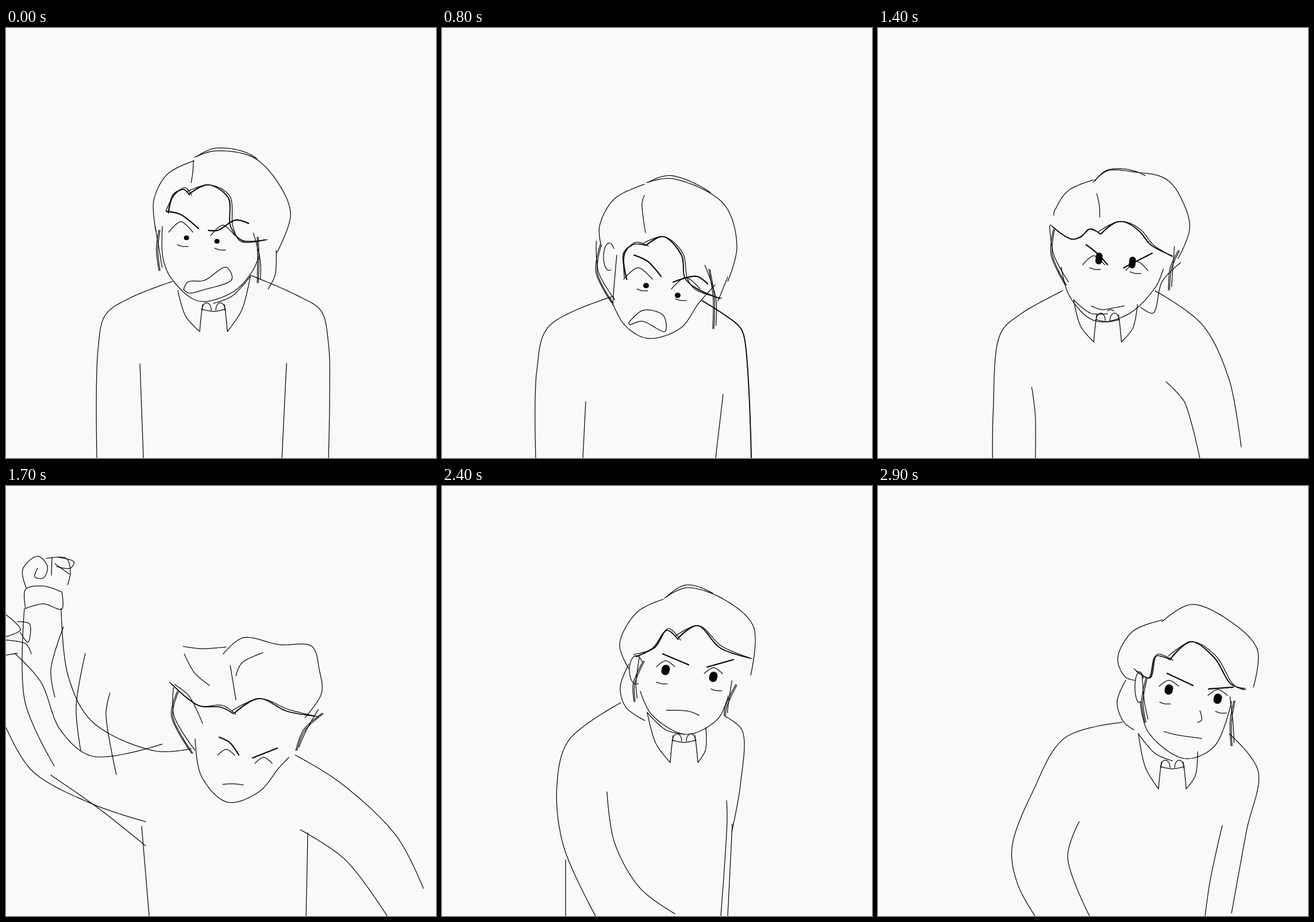
Recreate the animation shown at these times as an HTML page. Size 748x748 px, loop 3000 ms.

```html
<!DOCTYPE html>
<html lang="en">
<head>
<meta charset="utf-8">
<title>Angry line drawing</title>
<style>
html, body { margin: 0; width: 100%; height: 100%; overflow: hidden; background: #f9f8fa; }
svg { display: block; width: 100%; height: 100%; }
path { fill: none; stroke: #060606; stroke-linecap: round; stroke-linejoin: round; }
</style>
</head>
<body>
<svg id="stage" viewBox="0 0 748 748"></svg>
<script>
// lines: key points of smooth strokes. The face details and collar follow rules.
// eyes: centres, pupil width and height; lid: outward shift, half width, rise.
const shout = {
  lines: {
    hair: ["328,225 362,214 430,225 475,272 495,325 471,391", "327,231 281,254 257,300 261,354"],
    part: ["326,230 325,250 322,269"],
    fringe: ["283,322 292,290 310,281 319,290", "319,289 352,273 387,295 391,345 412,371 450,368"],
    locks: ["268,352 264,385 268,422", "439,364 440,405 439,443"],
    tail: ["470,387 468,430 456,454"],
    jaw: ["272,345 273,400 288,436 335,475 395,459 428,424 441,395"],
    brows: ["279,319 303,324 335,349", "352,352 368,352 400,334 422,340"],
    mouth: ["309,455 316,442 345,439 383,416 393,437 345,455 318,461 309,455"],
    shoulders: ["425,430 510,467 548,492 561,550 563,640 561,748", "289,441 215,470 173,499 160,560 158,748"],
    arms: ["488,583 480,748", "233,584 239,748"]
  },
  eyes: { at: "314,365 367,371", wide: 8, tall: 0, bag: 14 },
  lid: { out: 10, half: 21, up: 28 },
  collar: "299,457 425,432 361,491", halo: true
};

const bow = {
  lines: {
    hair: ["352,291 387,265 450,280 505,323 523,385 508,447", "352,293 298,304 264,360 272,412"],
    part: ["350,313 360,340 374,373"],
    fringe: ["341,449 332,400 352,380 371,392", "371,391 412,375 445,397 480,455 516,507"],
    locks: ["274,412 260,450 294,499", "480,414 500,460 535,474"],
    tail: ["458,500 454,516 457,531 444,524"],
    wisps: ["306,404 318,438 366,452"],
    jaw: ["300,455 312,507 345,546 380,558 430,538 457,500 477,458"],
    brows: ["340,437 353,422 389,455", "412,457 445,444 467,457"],
    mouth: ["337,531 372,522 408,510 417,540 385,534 345,542 337,531"],
    shoulders: ["470,484 525,525 538,575 555,675 552,748", "279,482 220,508 187,527 172,600 175,748"],
    arms: ["498,638 487,748", "249,653 256,748"]
  },
  eyes: { at: "375,470 422,476", wide: 9, tall: 0, bag: 4 },
  lid: { out: 14, half: 21, up: 23 },
  ear: [294, 426, 9, 20], heavy: true
};

const scowl = {
  lines: {
    hair: ["356,269 400,262 490,306 513,380 497,441", "352,272 300,297 274,345 277,380"],
    part: ["352,291 348,305 354,356"],
    fringe: ["322,438 317,392 335,376 355,378", "356,378 385,363 417,395 423,435 445,455 482,470"],
    locks: ["277,378 270,425 297,478", "466,420 474,470 473,523"],
    tail: ["497,433 480,475"],
    wisps: ["304,395 300,440 297,482"],
    jaw: ["293,470 318,517 358,540 415,522 447,478 475,447"],
    brows: ["334,395 358,406 381,432", "402,442 443,432 462,445"],
    mouth: ["325,512 350,491 385,500 388,528 348,510 326,516 325,512"],
    shoulders: ["452,474 515,517 525,535 538,748", "297,467 185,520 165,595 163,748"],
    arms: ["489,637 476,748", "250,650 245,748"]
  },
  eyes: { at: "355,448 410,465", wide: 9, tall: 0, bag: 8 },
  lid: { out: 14, half: 25, up: 31 },
  ear: [291, 398, 10, 24], heavy: true, halo: true
};

const glare = {
  lines: {
    hair: ["372,252 395,236 455,239 510,278 537,335 523,400", "369,254 318,280 298,335 304,357"],
    part: ["374,272 378,284 376,300"],
    fringe: ["315,347 338,360 351,350 360,324 381,333", "382,334 410,313 447,335 462,370 495,395"],
    locks: ["312,346 312,390 330,436", "506,382 504,415 508,453"],
    tail: ["524,392 492,425 476,480 455,470"],
    jaw: ["312,400 325,435 360,476 395,486 447,467 487,425 499,384"],
    brows: ["356,337 395,374", "426,380 480,349"],
    mouth: ["367,460 392,471 413,466 438,459"],
    lip: ["397,476 402,474 408,476"],
    shoulders: ["468,450 555,519 567,620 569,748", "319,441 245,482 211,515 198,650 197,748"],
    arms: ["494,627 495,650 491,748", "265,609 271,655 271,748"]
  },
  eyes: { at: "382,385 440,392", wide: 11.5, tall: 9, bag: 18 },
  lid: { out: 12, half: 22, up: 30 },
  collar: "338,457 449,465 397,493", halo: true
};

const strike = {
  lines: {
    hair: ["378,292 412,264 475,276 532,279 545,320 549,360 520,403", "383,280 340,283 308,279"],
    part: ["390,312 400,372"],
    fringe: ["289,345 335,382 375,385 396,396", "398,395 440,370 490,392 538,400"],
    locks: ["300,358 290,400 325,465", "552,396 520,425 506,460"],
    wisps: ["310,292 328,325 354,347", "293,345 318,365 342,413", "447,290 410,308 400,330"],
    jaw: ["329,440 340,505 385,550 440,532 475,490 492,472"],
    brows: ["371,437 389,446 405,468", "429,473 472,456"],
    mouth: ["377,519 395,518 413,520"],
    shoulders: ["503,468 580,515 680,610 726,700"],
    arms: ["512,598 590,650 663,748"],
    waist: ["525,603 522,748", "236,592 249,748"],
    raised: ["322,457 260,461 150,410 108,330 96,213", "32,213 33,375 84,487", "15,291 60,340 95,425 150,470 272,449",
      "0,420 45,495 150,553 243,584", "78,503 160,560 243,626", "138,291 122,385 130,460",
      "181,360 174,395 192,502", "100,245 78,320 85,367"],
    hand: ["35,177 29,145 55,122 72,140 65,160 50,158 55,143", "70,126 105,126 112,150 107,172", "80,125 79,155",
      "85,135 110,153", "92,124 118,132 112,143 88,140", "34,213 34,180 65,174 96,184", "97,184 97,214 65,205 34,213",
      "0,224 25,250 0,262", "20,236 41,240 38,272 25,255", "0,268 35,275 44,292", "0,294 20,291"]
  },
  eyes: { at: "383,474 448,488", wide: 0 },
  lid: { out: 0, half: 15, up: 16 }
};

const sulk = {
  lines: {
    hair: ["387,195 425,177 490,197 542,245 537,329", "385,197 340,219 309,275 325,318"],
    fringe: ["338,297 368,282 392,251 411,267", "411,265 445,243 485,282 535,299"],
    locks: ["352,305 335,345 336,375", "513,346 495,385 493,400"],
    tail: ["325,310 310,350 320,385 353,408"],
    jaw: ["345,357 365,398 425,432 480,405 498,365"],
    brows: ["384,292 429,311", "461,315 507,302"],
    mouth: ["390,390 430,392 447,399"],
    shoulders: ["493,401 522,425 519,520 504,602", "311,377 220,443 200,520 211,625 267,748"],
    arms: ["495,547 496,580 485,748", "287,532 300,620 345,700 405,744"],
    waist: ["505,588 497,748", "215,650 215,748"]
  },
  eyes: { at: "389,320 472,332", wide: 14, tall: 4, bag: 23 },
  lid: { out: 0, half: 16, up: 16 },
  ear: [338, 320, 12, 25], collar: "357,394 459,420 421,444", halo: true
};

const lean = {
  lines: {
    hair: ["494,236 545,206 615,237 660,285 653,350", "495,233 443,253 417,300 430,332 447,338"],
    fringe: ["450,322 472,334 484,296 509,302", "510,300 545,271 585,298 615,345 640,354"],
    locks: ["468,335 461,375 466,411", "621,374 615,410 616,452"],
    tail: ["431,338 416,375 427,410 445,424"],
    jaw: ["456,375 470,428 533,474 585,453 615,375"],
    brows: ["503,326 548,347", "575,353 618,350"],
    nose: ["560,391 563,407 556,411"],
    mouth: ["497,427 520,433 563,439"],
    shoulders: ["611,431 661,495 641,600 615,743", "425,411 325,438 270,530 233,630 243,693 273,748"],
    arms: ["599,590 578,685 569,748", "350,584 330,645 368,748"]
  },
  eyes: { at: "506,354 591,370", wide: 14, tall: 4, bag: 24 },
  lid: { out: 0, half: 17, up: 16 },
  ear: [455, 350, 8, 27], collar: "453,431 556,462 512,490"
};

const LOOP = 3000, STEP = 100, SAMPLES = 64, THIN = 1.25, SWITCH = 0.6;
const HELD = [5, 15, 25]; // steps that repeat the one before
const STYLE = {
  fringe: { copies: 3, spread: 5 },
  locks: { copies: 3, spread: 9 },
  brows: { width: 2.2 }
};

const mix = (a, b, t) => a + (b - a) * t;
const mixPoint = (p, q, t) => p.map((v, k) => mix(v, q[k], t));
const points = text => text.split(" ").map(p => p.split(",").map(Number));
const noise = seed => (Math.abs(Math.sin(seed * 12.9898) * 43758.5453) % 1) - 0.5;

// Centripetal Catmull-Rom segment between b and c
function spline(a, b, c, d, t) {
  const gap = (p, q) => Math.sqrt(Math.hypot(p[0] - q[0], p[1] - q[1])) + 1e-4;
  const ta = -gap(a, b), tc = gap(b, c), td = tc + gap(c, d), u = t * tc;
  const ab = mixPoint(a, b, (u - ta) / -ta);
  const bc = mixPoint(b, c, t);
  const cd = mixPoint(c, d, (u - tc) / (td - tc));
  return mixPoint(mixPoint(ab, bc, (u - ta) / (tc - ta)), mixPoint(bc, cd, u / td), t);
}

function smooth(knots) {
  const last = knots.length - 1;
  const knot = i => knots[Math.max(0, Math.min(last, i))];
  return Array.from({ length: SAMPLES + 1 }, (_, n) => {
    const u = n / SAMPLES * last, i = Math.min(Math.floor(u), last - 1);
    return spline(knot(i - 1), knot(i), knot(i + 1), knot(i + 2), u - i);
  });
}

const scatter = (knots, copy, spread) =>
  knots.map((p, i) => p.map((v, k) => v + copy * spread * noise(1 + copy * 31 + i * 7 + k)));

const arc = (cx, cy, rx, ry, from, to) => Array.from({ length: 9 }, (_, i) => {
  const angle = mix(from, to, i / 8) * Math.PI;
  return [cx + rx * Math.cos(angle), cy + ry * Math.sin(angle)];
});

function build({ lines, eyes, lid, ear, collar, heavy, halo }) {
  const strokes = {};
  const add = (name, knots, width = THIN) => strokes[name] = { width, curve: smooth(knots) };

  for (const [group, texts] of Object.entries(lines)) {
    const { copies = 1, spread = 0, width } = STYLE[group] || {};
    texts.forEach((text, i) => {
      for (let copy = 0; copy < copies; copy++) {
        add(group + i + copy, scatter(points(text), copy, spread), width);
      }
    });
  }
  if (heavy) strokes.shoulders00.width = 1.9;
  if (halo) {
    const edge = strokes.hair00.curve.slice(3, 28);
    add("halo", edge.map(([x, y], i) => [x + 1, y - 5 * Math.sin(i / edge.length * Math.PI)]));
  }
  if (ear) add("ear", arc(...ear, 1.8, 0.4));

  points(eyes.at).forEach(([x, y], i) => {
    const side = i ? 1 : -1;
    add("lid" + i, [[-1, 0.35], [0, 1], [1, 0.35]]
      .map(([h, v]) => [x + side * lid.out + h * lid.half, y - v * lid.up]));
    if (!eyes.wide) return;
    add("pupil" + i, [[x + 0.5, y - eyes.tall / 2], [x - 0.5, y + eyes.tall / 2]], eyes.wide);
    const left = x - (i ? 4 : 16);
    add("bag" + i, [[left, y + eyes.bag - 2], [left + 9, y + eyes.bag + 1], [left + 19, y + eyes.bag + 1]]);
  });

  if (collar) {
    const [topL, topR, [cx, cy]] = points(collar);
    [topL, topR].forEach((top, i) => {
      const side = i ? 1 : -1, tip = [cx + side * 24, cy + 37];
      const bulge = mixPoint(top, tip, 0.55);
      add("collar" + i, [top, [bulge[0] + side * 7, bulge[1] + 6], tip, tip,
        [cx + side * 22, cy + 14], [cx + side * 19, cy - 10]]);
      add("knot" + i, arc(cx + side * 12, cy, 8, 13, 1, 2));
    });
    add("tie", [[cx - 21, cy - 2], [cx, cy + 2], [cx + 21, cy - 2]]);
    const high = topL[1] < topR[1] ? topL : topR;
    const chin = [cx, cy - 12], sag = mixPoint(high, chin, 0.5);
    add("neck", [high, [sag[0], sag[1] + 11], chin]);
  }
  return strokes;
}

const keys = [[0, shout], [400, bow], [800, scowl], [1200, glare], [1700, strike], [2400, sulk], [2900, lean]]
  .map(([time, pose]) => ({ time, strokes: build(pose) }));

const stage = document.getElementById("stage");
const paths = {};
for (const { strokes } of keys) {
  for (const name in strokes) {
    paths[name] ??= stage.appendChild(document.createElementNS(stage.namespaceURI, "path"));
  }
}

const blend = (a, b, t) => ({
  width: mix(a.width, b.width, t),
  curve: a.curve.map((p, i) => mixPoint(p, b.curve[i], t))
});

const shift = ({ width, curve }, [dx, dy]) => ({
  width, curve: curve.map(([x, y]) => [x + dx, y + dy])
});

// Shared strokes morph; the others follow the head and switch over once.
function draw(time) {
  const at = keys.findLastIndex(key => key.time <= time);
  const from = keys[at], to = keys[at + 1] || from;
  const t = to === from ? 0 : (time - from.time) / (to.time - from.time);
  const near = (t > SWITCH ? to : from).strokes;
  const head = blend(from.strokes.hair00, to.strokes.hair00, t).curve[0];
  const offset = head.map((v, k) => v - near.hair00.curve[0][k]);
  for (const name in paths) {
    const a = from.strokes[name], b = to.strokes[name];
    const stroke = a && b ? blend(a, b, t) : near[name] && shift(near[name], offset);
    paths[name].setAttribute("d", stroke
      ? "M" + stroke.curve.map(p => p.map(v => v.toFixed(1)).join(" ")).join("L") : "");
    if (stroke) paths[name].setAttribute("stroke-width", stroke.width);
  }
}

const start = performance.now();
let shown = -1;
function tick() {
  let step = Math.floor((performance.now() - start) % LOOP / STEP);
  if (HELD.includes(step)) step--;
  if (step !== shown) draw((shown = step) * STEP);
  requestAnimationFrame(tick);
}
tick();
</script>
</body>
</html>
```
